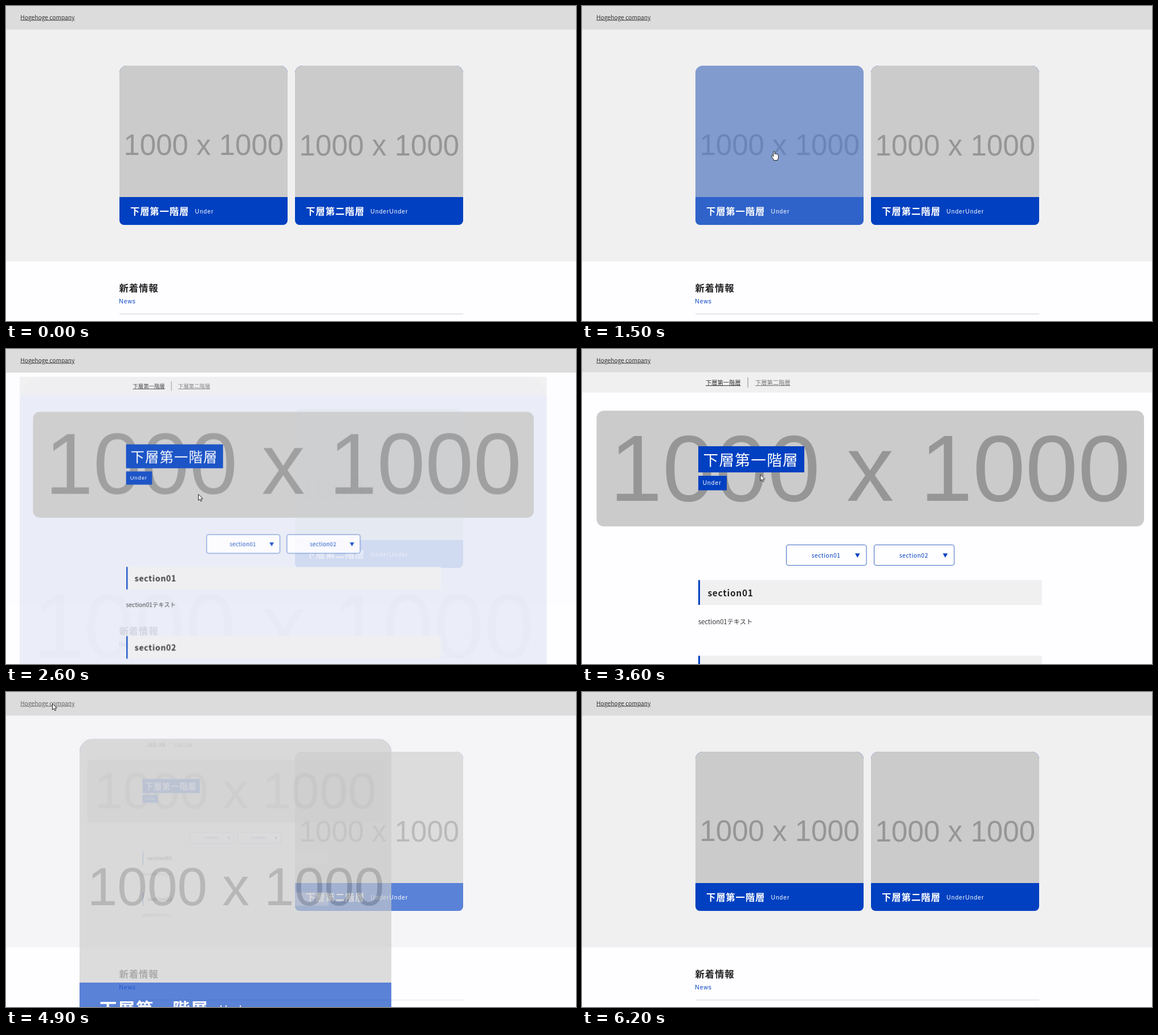
An HTML page that plays this animation: 1000x554 px, repeating every 6900 ms.

```html
<!DOCTYPE html>
<html lang="ja">
<head>
<meta charset="utf-8">
<title>Page transition</title>
<style>
  @property --p  { syntax: "<number>"; inherits: true; initial-value: 0; }
  @property --h1 { syntax: "<number>"; inherits: true; initial-value: 0; }
  @property --o1 { syntax: "<number>"; inherits: true; initial-value: 1; }
  @property --h2 { syntax: "<number>"; inherits: true; initial-value: 0; }

  html, body { margin: 0; width: 100%; height: 100%; overflow: hidden; background: #fefdff; }
  svg { display: block; width: 100vw; height: 100vh; --blue: #0040c1;
        animation: morph 6.9s infinite, hover1 6.9s infinite, hover2 6.9s infinite; }

  text { font-family: "Noto Sans CJK JP", "Noto Sans CJK", sans-serif; font-size: 10.24px; fill: #333; white-space: pre; }
  .sans { font-family: "Liberation Sans", Arial, sans-serif; letter-spacing: .1em; }
  .title { font-size: 16.4px; font-weight: 700; letter-spacing: .05em; }
  .holder { font-family: "Liberation Sans", Arial, sans-serif; fill: #969696; text-anchor: middle; }
  .white { fill: #fff; }
  .blue { fill: var(--blue); }
  .gray { fill: #cbcbcb; }
  .pale { fill: #f0f0f1; }
  .link { text-decoration: underline; }
  .home-link { animation: link 6.9s infinite; }
  .button { font-weight: 500; letter-spacing: .05em; }
  .heading { font-size: 15.36px; font-weight: 700; letter-spacing: .05em; fill: #222; }
  .body { font-size: 11.26px; }

  /* --p: 0 = top page, 1 = lower page */
  .home { opacity: calc(1 - var(--p)); }
  .group { transform: translate(calc(199px * (1 - var(--p))), calc(105px - 64px * var(--p)))
                      scale(calc(.2918 + .7082 * var(--p))); }
  .first { transform: scale(3.427); opacity: calc((1 - var(--p)) * var(--o1)); --h: var(--h1); }
  .second { transform: translate(507px, 105px); opacity: calc(1 - .2 * var(--h2)); --h: var(--h2); }
  .photo { opacity: calc(1 - .5 * var(--h)); }
  .page { opacity: var(--p); }
  .back { animation: back 6.9s step-end infinite; }
  .front { animation: front 6.9s step-end infinite; }

  .pointer { animation: travel 6.9s linear infinite; }
  .arrow { animation: arrow 6.9s step-end infinite; }
  .hand { animation: hand 6.9s step-end infinite; }
  .pointer path { fill: #fff; stroke: #222; stroke-width: 1; stroke-linejoin: round; }

  @keyframes morph {
    0%, 33.41% { --p: 0; animation-timing-function: ease; }
    40.65%, 68.3% { --p: 1; animation-timing-function: ease; }
    75.55%, 100% { --p: 0; }
  }
  @keyframes hover1 {
    0%, 7.25% { --h1: 0; --o1: 1; }
    15.94%, 33.4% { --h1: 1; --o1: .8; }
    33.41%, 42% { --h1: 1; --o1: 1; }
    42.01%, 81.16% { --h1: 0; --o1: 1; }
    84.06% { --h1: .45; --o1: .91; }
    89.86%, 100% { --h1: 0; --o1: 1; }
  }
  @keyframes hover2 {
    0%, 4.78% { --h2: 0; animation-timing-function: ease-out; }
    7.68% { --h2: .8; }
    16.67%, 100% { --h2: 0; }
  }
  @keyframes link {
    0%, 59% { opacity: 1; }
    64%, 77.5% { opacity: .7; }
    85%, 100% { opacity: 1; }
  }
  @keyframes back  { 0% { visibility: hidden; }  68.3% { visibility: visible; } }
  @keyframes front { 0% { visibility: visible; } 68.3% { visibility: hidden; } }
  @keyframes travel {
    0% { transform: translate(1040px, 570px); }
    1.45% { transform: translate(985px, 545px); }
    4.35% { transform: translate(650px, 391px); }
    7.25% { transform: translate(470px, 309px); }
    10.14% { transform: translate(398px, 269px); }
    15.94% { transform: translate(345px, 257px); }
    18.8%, 50% { transform: translate(337px, 255px); }
    52.17% { transform: translate(313px, 221px); }
    57.97% { transform: translate(120px, 60px); }
    60.87%, 76.1% { transform: translate(81px, 20px); }
    79.71% { transform: translate(157.5px, 141px); }
    85.5% { transform: translate(430px, 560px); }
    87% { transform: translate(430px, 570px); }
    100% { transform: translate(1040px, 570px); }
  }
  @keyframes hand {
    0%, 33.4%, 68.3%, 77.3%, 83.4%, 100% { visibility: hidden; }
    4.6%, 59.5%, 75.55%, 81.16% { visibility: visible; }
  }
  @keyframes arrow {
    0%, 33.4%, 68.3%, 77.3%, 83.4%, 100% { visibility: visible; }
    4.6%, 59.5%, 75.55%, 81.16% { visibility: hidden; }
  }
</style>
</head>
<body>
<svg viewBox="0 0 1000 554" preserveAspectRatio="none">
  <defs>
    <clipPath id="round">
      <path d="M0 13A13 13 0 0 1 13 0H282A13 13 0 0 1 295 13V272A8 8 0 0 1 287 280H8A8 8 0 0 1 0 272Z"/>
    </clipPath>
    <g id="face" clip-path="url(#round)">
      <rect class="blue" width="295" height="280"/>
      <g class="photo">
        <rect class="gray" width="295" height="231"/>
        <text class="holder" x="147.8" y="157.5" style="font-size:51px">1000 x 1000</text>
      </g>
    </g>
    <g id="button">
      <rect x=".5" y=".5" width="140.5" height="36" rx="3.5" fill="#fefdff" stroke="#3d6cc4"/>
      <path class="blue" d="M121 15.5h8.6l-4.3 7.5z"/>
    </g>
    <g id="bar">
      <rect class="pale" width="603" height="43.5"/>
      <rect class="blue" width="3" height="43.5"/>
    </g>
    <g id="page" transform="translate(0 -41)">
      <rect class="pale" y="41" width="1011" height="35.5"/>
      <text class="link" x="217" y="62.9">下層第一階層</text>
      <path d="M291 50v18" stroke="#888"/>
      <text class="link" x="304" y="62.9" style="fill:#777">下層第二階層</text>

      <rect class="gray" x="25.5" y="108.5" width="960.5" height="203.5" rx="13"/>
      <text class="holder" x="505.5" y="266.5" style="font-size:166px">1000 x 1000</text>
      <rect class="blue" x="204" y="171" width="186" height="46"/>
      <text class="white" x="212.5" y="205.3" style="font-size:26.6px;font-weight:500;letter-spacing:.05em">下層第一階層</text>
      <rect class="blue" x="204" y="223" width="50" height="25.5"/>
      <text class="sans white" x="211.7" y="239">Under</text>

      <use href="#button" x="358" y="344"/>
      <text class="button blue" x="402.7" y="366.7">section01</text>
      <use href="#button" x="512" y="344"/>
      <text class="button blue" x="556.7" y="366.7">section02</text>

      <use href="#bar" x="204" y="406.5"/>
      <text class="heading" x="220.5" y="434.8">section01</text>
      <text class="body" x="204" y="484">section01テキスト</text>
      <use href="#bar" x="204" y="539.5"/>
      <text class="heading" x="220.5" y="567.8">section02</text>
      <text class="body" x="204" y="617">section02テキスト</text>
    </g>
  </defs>

  <rect width="1000" height="554" fill="#fefdff"/>

  <g class="home">
    <rect class="pale" y="41" width="1000" height="408"/>
    <g class="second">
      <use href="#face"/>
      <text class="title white" x="19" y="262.3">下層第二階層</text>
      <text class="sans white" x="132.5" y="259.8">UnderUnder</text>
    </g>
    <text class="title" x="198.5" y="502.3" style="fill:#222">新着情報</text>
    <text class="sans blue" x="198.3" y="522.8">News</text>
    <rect x="199" y="541" width="603" height="1.3" fill="#dcdbe0"/>
  </g>

  <rect width="1000" height="41.5" fill="#dcdcdc"/>
  <text class="link home-link" x="25.3" y="23.5">Hogehoge company</text>

  <g class="group">
    <g class="page"><use class="back" href="#page"/></g>
    <g class="first">
      <use href="#face"/>
      <text class="title white" x="19" y="262.3">下層第一階層</text>
      <text class="sans white" x="132.5" y="259.8">Under</text>
    </g>
    <g class="page"><use class="front" href="#page"/></g>
  </g>

  <g class="pointer">
    <path class="arrow" d="M.5 .5v10.7l2.5-2.3 1.7 3.9 1.9-.8-1.7-3.8h3.4z"/>
    <path class="hand" d="M-1.2 1.2q1.2-1.6 2.4 0v4q1.2-.8 2.2.3 1.300-.6 2 .5 2-.5 2 1.500v4q0 2-1.400 3.600v1.400h-6.500v-1.200l-4-5.400q-.8-1.700.8-2l2.500 1.900z"/>
  </g>
</svg>
</body>
</html>
```
